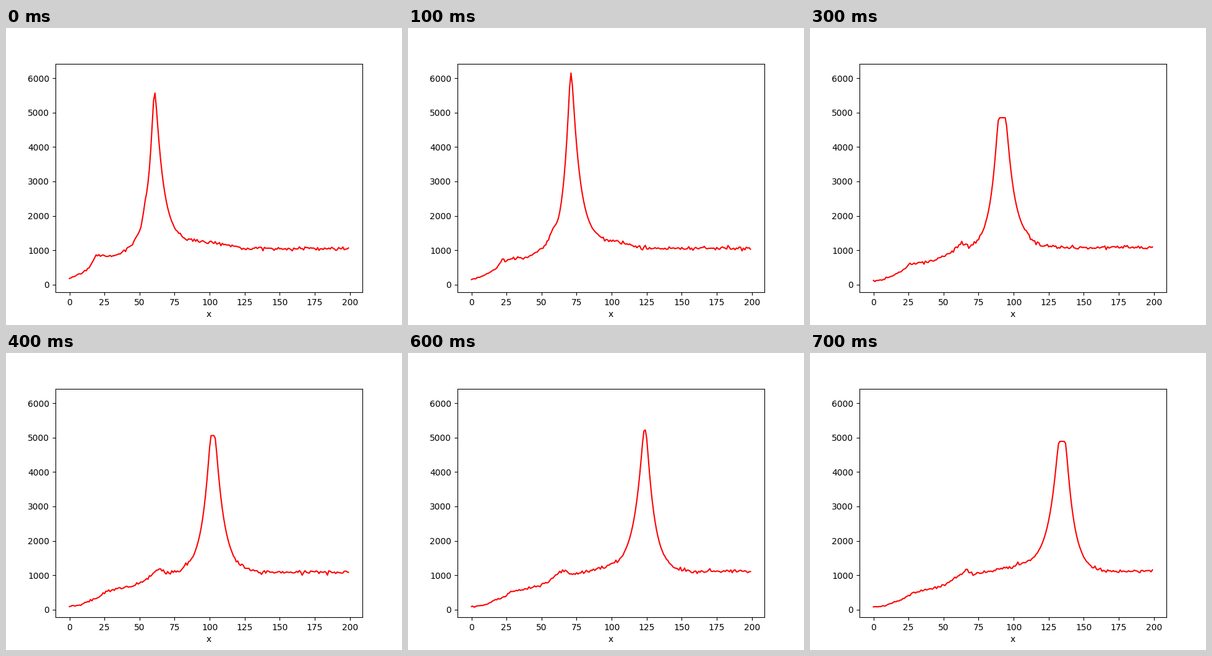
Write a matplotlib script that moves like this. It is 640x480 px and loops after 0.8 s.

```python
import numpy as np
import matplotlib.pyplot as plt
from matplotlib.animation import FuncAnimation

X = np.arange(200)
STEPS = 8
PEAK_HEIGHTS = (5600, 6150, 5950, 4850, 5060, 5270, 5220, 4890)


def lerp(start, end, t):
    return start + (end - start) * t


def left_base(center, step):
    """Rising floor with two shoulders that settle while the peak moves on."""
    settle = 1 - np.exp(-step / 2.5)
    travel = step / (STEPS - 1)
    start = np.array([(0, 180), (8, 320), (14, 510), (19, 840), (33, 840),
                      (51, 1130), (54, 1380), (57, 1040)])
    end = np.array([(0, 75), (8, 95), (24, 360), (28, 470), (50, 670),
                    (56, 820), (67, 1140), (73, 1030)])
    px, py = lerp(start, end, settle).T
    middle = (px[-1] + center) / 2
    px = [*px, middle, center]
    py = [*py, lerp(900, 1270, travel), lerp(750, 1230, travel)]
    return np.interp(X, px, py)


def right_base(step):
    """Level floor with a soft step down near x = 113."""
    return 1050 + 9 * step + 190 / (1 + np.exp((X - 113) / 4))


def spectrum(step):
    center = 60.7 + 10.2 * step + 0.05 * step ** 2
    height = PEAK_HEIGHTS[step]
    is_left = X < center
    base = np.where(is_left, left_base(center, step), right_base(step))

    # Exponential flanks; lower peaks get a flatter top.
    flat = max(0, (5300 - height) / 200)
    distance = np.maximum(np.abs(X - center) - flat, 0)
    distance = np.hypot(distance, 1) - 1
    width = np.where(is_left, 4.2 + 0.35 * step, 5.7)
    y = base + (height - base) * np.exp(-distance / width)

    # Counting noise, faded out on the steep peak.
    sigma = 0.85 * np.sqrt(y) * np.clip((1800 - y) / 500, 0, 1)
    return y + sigma * np.random.default_rng(step).normal(size=X.size)


fig, ax = plt.subplots(figsize=(6.4, 4.8), dpi=100)
ax.set_xlim(-9.95, 208.95)
ax.set_ylim(-222, 6422)
ax.set_xlabel("x")
line, = ax.plot(X, spectrum(0), color="red")


def update(step):
    line.set_ydata(spectrum(step))
    return line,


anim = FuncAnimation(fig, update, frames=STEPS, interval=100,
                     repeat=True, repeat_delay=0)
plt.show()
```
